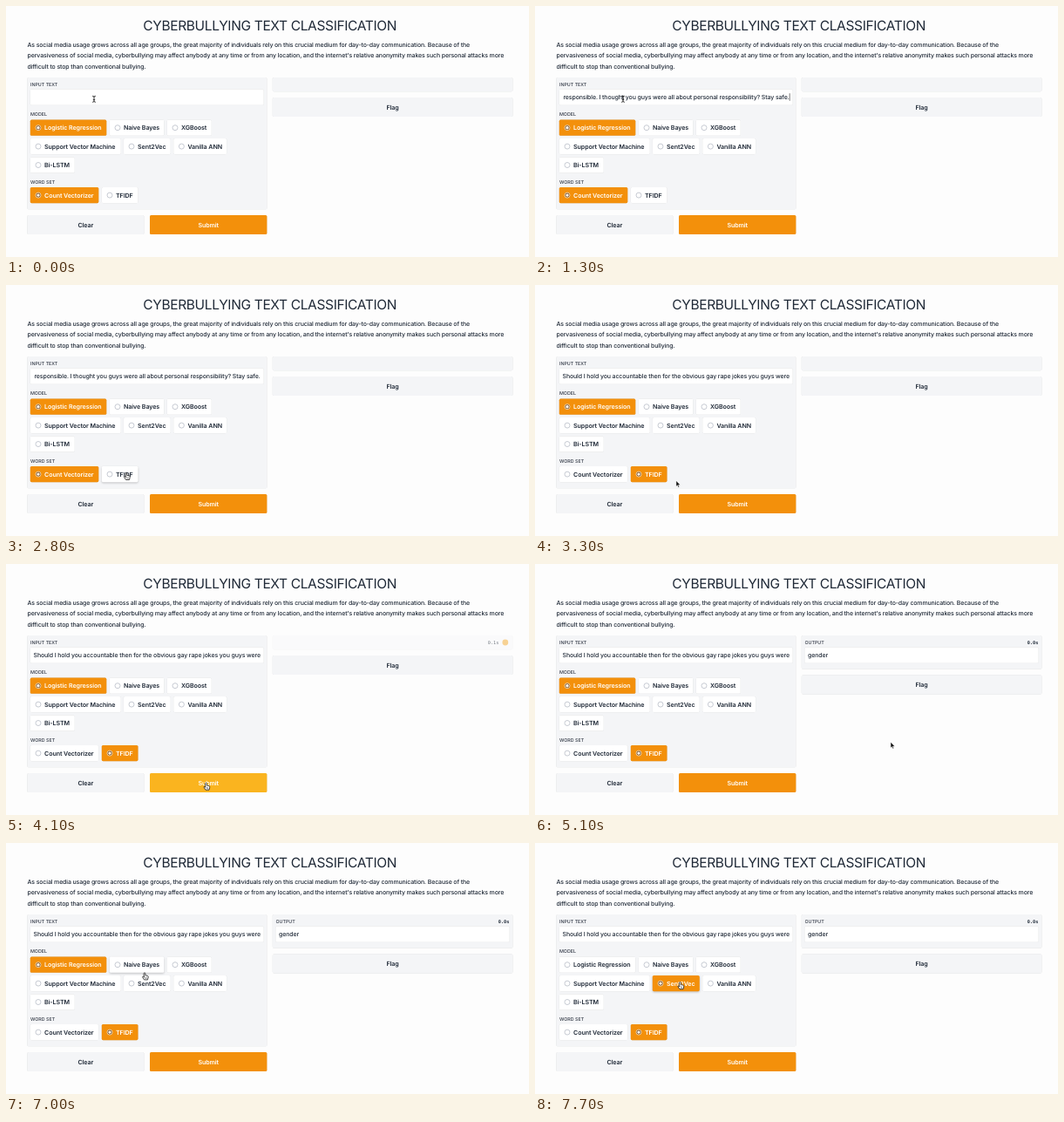
An HTML page that plays this animation: 600x288 px, repeating every 8 s.

```html
<!DOCTYPE html>
<html lang="en">
<head>
<meta charset="utf-8">
<title>Cyberbullying text classification</title>
<style>
  html, body { margin: 0; width: 100%; height: 100%; overflow: hidden; background: #fdfdfd; }
  #stage { display: block; width: 600px; height: 288px; }
  text { font: 500 6.97px Inter, "Open Sans", sans-serif; letter-spacing: -.018em; fill: #1f2937;
         text-rendering: geometricPrecision; white-space: pre; }
  .title { font-size: 15.5px; font-weight: 400; letter-spacing: -.022em; text-anchor: middle; }
  .caption { font-size: 5.35px; letter-spacing: -.005em; fill: #303744; }
  .value { letter-spacing: -.017em; }
  .end { text-anchor: end; }
  .bold { font-size: 7.1px; font-weight: 600; letter-spacing: -.012em; }
  .middle { text-anchor: middle; }
  .timer { font: 700 5.2px "DejaVu Sans Mono", "Liberation Mono", monospace; letter-spacing: 0; text-anchor: end; }
  #loading { opacity: .6; }
  #loading .timer { font-weight: 400; }
  .panel { fill: #f4f5f7; filter: drop-shadow(0 .6px .5px rgba(0,0,0,.16)); }
  .panel.faded { fill: #fafafb; filter: drop-shadow(0 .6px .5px rgba(0,0,0,.06)); }
  .box { fill: #fff; filter: drop-shadow(0 .6px .7px rgba(0,0,0,.18)); }
  .hover .box { filter: drop-shadow(0 1px 1.2px rgba(0,0,0,.22)); }
  .submit { fill: #f3900b; filter: drop-shadow(0 .5px .5px rgba(0,0,0,.13)); }
  .submit.hover { fill: #fab41f; }
  .white { fill: #fff; }
  .ring { fill: #fff; stroke: #b9bec8; stroke-width: .8; }
  .dot { fill: none; }
  .on .box { fill: #f3900b; }
  .on text { fill: #fff; }
  .on .ring { fill: #80511c; stroke: #fff2e0; stroke-width: .7; }
  .on .dot { fill: #fff; }
  .caret { fill: #222; }
  .pointer { stroke-linejoin: round; stroke-linecap: round; }
</style>
</head>
<body>
<svg id="stage" viewBox="0 0 600 288"></svg>
<script>
const LOOP = 8000;
const PASTE = 1000, PICK_WORDS = 3000, SUBMIT = 4000, RESULT = 4200, PICK_MODEL = 7500;

const rect = (x, y, w, h, cls, id = '') =>
  `<rect id="${id}" x="${x}" y="${y}" width="${w}" height="${h}" rx="1.6" class="${cls}"/>`;
const text = (x, y, str, cls = '', id = '') =>
  `<text id="${id}" x="${x}" y="${y}" class="${cls}">${str}</text>`;
const group = (id, body) => `<g id="${id}">${body}</g>`;

// label, x, y, width
const RADIO_HEIGHT = 18.2;
const radios = {
  logistic: ['Logistic Regression', 27.8, 130.6, 87.5],
  bayes: ['Naive Bayes', 118.8, 130.6, 62.5],
  boost: ['XGBoost', 184.8, 130.6, 51],
  svm: ['Support Vector Machine', 27.8, 152, 104],
  sent: ['Sent2Vec', 134.8, 152, 54],
  ann: ['Vanilla ANN', 192.2, 152, 61],
  lstm: ['Bi-LSTM', 27.8, 173.4, 51],
  count: ['Count Vectorizer', 27.8, 208, 78.5],
  tfidf: ['TFIDF', 109.8, 208, 41.7],
};
const radio = ([id, [label, x, y, w]]) => group(id,
  rect(x, y, w, RADIO_HEIGHT, 'box') +
  `<circle class="ring" cx="${x + 9.2}" cy="${y + 9.1}" r="3"/>` +
  `<circle class="dot" cx="${x + 9.2}" cy="${y + 9.1}" r="1.7"/>` +
  text(x + 16.2, y + 11.6, label, 'bold'));

const pointers =
  group('ibeam', '<path d="M-1.5-3.5Q0-3.5 0-2.5Q0-3.5 1.5-3.5M0-2.5V2.5M-1.5 3.5Q0 3.5 0 2.5Q0 3.5 1.5 3.5M-.8 .8H.8" fill="none" stroke="#111" stroke-width=".8"/>') +
  group('arrow', '<path d="M0 0V6.6L1.5 5.2L2.5 7.6L3.6 7.1L2.6 4.8H4.7Z" fill="#111" stroke="#fff" stroke-width=".5"/>') +
  group('hand', '<path d="M-.8 .6Q0-.5 .8 .6V3.1L3.4 3.6Q4.5 4 4.2 5.3L3.5 8.2H-.5L-2.4 5.2Q-2.5 4.2-1.5 4.5L-.8 5.1Z" fill="#fff" stroke="#111" stroke-width=".75"/><path d="M.9 5.4V6.9M2.1 5.4V6.9" stroke="#111" stroke-width=".4"/>');

const stage = document.getElementById('stage');
stage.innerHTML =
  text(302.7, 27.7, 'CYBERBULLYING TEXT CLASSIFICATION', 'title') +
  [
    'As social media usage grows across all age groups, the great majority of individuals rely on this crucial medium for day-to-day communication. Because of the',
    "pervasiveness of social media, cyberbullying may affect anybody at any time or from any location, and the internet's relative anonymity makes such personal attacks more",
    'difficult to stop than conventional bullying.',
  ].map((line, i) => text(24.5, 46.6 + 12.5 * i, line)).join('') +

  rect(24.4, 82, 275, 151.3, 'panel') +
  text(28, 91.5, 'INPUT TEXT', 'caption') +
  rect(27.8, 95.4, 267.9, 18.4, 'box') +
  '<svg x="31.5" y="96" width="261.3" height="17">' +
    text(0, 11, 'Should I hold you accountable then for the obvious gay rape jokes you guys were', 'value', 'textStart') +
    text(260.2, 11, 'responsible. I thought you guys were all about personal responsibility? Stay safe.', 'value end', 'textEnd') +
  '</svg>' +
  '<rect id="caret" class="caret" y="100.2" width=".6" height="8.6"/>' +
  text(28, 126.4, 'MODEL', 'caption') +
  text(28, 203.9, 'WORD SET', 'caption') +
  Object.entries(radios).map(radio).join('') +

  rect(24.4, 240, 134, 22, 'panel') + text(91.3, 253.7, 'Clear', 'bold middle') +
  rect(165, 240, 134.4, 22, 'submit', 'submit') + text(232.2, 253.7, 'Submit', 'bold middle white') +

  rect(305.8, 82, 275.6, 16.2, 'panel', 'output') +
  group('loading', text(565.3, 92, '', 'timer', 'elapsed') + '<circle cx="572.8" cy="90" r="3.4" fill="#f6b950"/>') +
  group('result',
    text(309.5, 91.5, 'OUTPUT', 'caption') +
    text(577.3, 91.5, '0.0s', 'timer') +
    rect(309.3, 95.4, 268.4, 18.4, 'box') +
    text(313, 107, 'gender', 'value')) +
  group('flag', rect(305.8, 105.1, 275.6, 22, 'panel') + text(443.5, 118.7, 'Flag', 'bold middle')) +
  `<g id="pointer" class="pointer">${pointers}</g>`;

const $ = id => document.getElementById(id);
const show = (id, visible) => $(id).setAttribute('visibility', visible ? 'visible' : 'hidden');

// time, x, y of the pointer's hot spot
const path = [
  [0, 101, 106.8], [1700, 101, 106.8], [2500, 135, 212], [2800, 138, 215.3],
  [3100, 138, 215.3], [3700, 229.5, 251], [4600, 229.5, 251], [4950, 415, 215],
  [5100, 408, 204.5], [5400, 183, 188], [6000, 163, 160], [6300, 160, 152],
  [7000, 159, 148.7], [7400, 166.5, 159.5], [LOOP, 166.5, 159.5],
];

function pointerAt(t) {
  const i = path.findIndex(p => p[0] > t);
  const [t0, x0, y0] = path[i - 1], [t1, x1, y1] = path[i];
  const u = (t - t0) / (t1 - t0), k = u * u * (3 - 2 * u);
  return [x0 + (x1 - x0) * k, y0 + (y1 - y0) * k];
}

const inside = (px, py, x, y, w, h) => px >= x && px <= x + w && py >= y && py <= y + h;

function render(t) {
  const [x, y] = pointerAt(t);
  const overSubmit = inside(x, y, 165, 240, 134.4, 22);
  const overInput = inside(x, y, 27.8, 95.4, 267.9, 18.4);
  const overRadio = Object.keys(radios).find(id => {
    const [, rx, ry, rw] = radios[id];
    return inside(x, y, rx, ry, rw, RADIO_HEIGHT);
  });
  const kind = overInput ? 'ibeam' : overSubmit || overRadio ? 'hand' : 'arrow';
  for (const name of ['ibeam', 'hand', 'arrow']) show(name, name === kind);
  $('pointer').setAttribute('transform', `translate(${x} ${y})`);
  $('submit').classList.toggle('hover', overSubmit);

  const pasted = t >= PASTE, blurred = t >= PICK_WORDS;
  show('textEnd', pasted && !blurred);
  show('textStart', blurred);
  const blinkOn = (t + 700) % 1000 < 500;
  show('caret', !blurred && (blinkOn || (pasted && t < 1300)));
  $('caret').setAttribute('x', pasted ? 291.8 : 31.8);

  const selected = [t < PICK_MODEL ? 'logistic' : 'sent', blurred ? 'tfidf' : 'count'];
  for (const id in radios) {
    $(id).classList.toggle('on', selected.includes(id));
    $(id).classList.toggle('hover', id === overRadio);
  }

  const done = t >= RESULT, loading = t >= SUBMIT && !done;
  show('loading', loading);
  show('result', done);
  $('elapsed').textContent = `${(Math.max(0, Math.floor((t - SUBMIT) / 100)) / 10).toFixed(1)}s`;
  $('output').classList.toggle('faded', loading);
  $('output').setAttribute('height', done ? 38.5 : 16.2);
  $('flag').setAttribute('transform', `translate(0 ${done ? 22.3 : 0})`);
}

const start = performance.now();
function tick() {
  render((performance.now() - start) % LOOP);
  requestAnimationFrame(tick);
}
tick();
</script>
</body>
</html>
```
